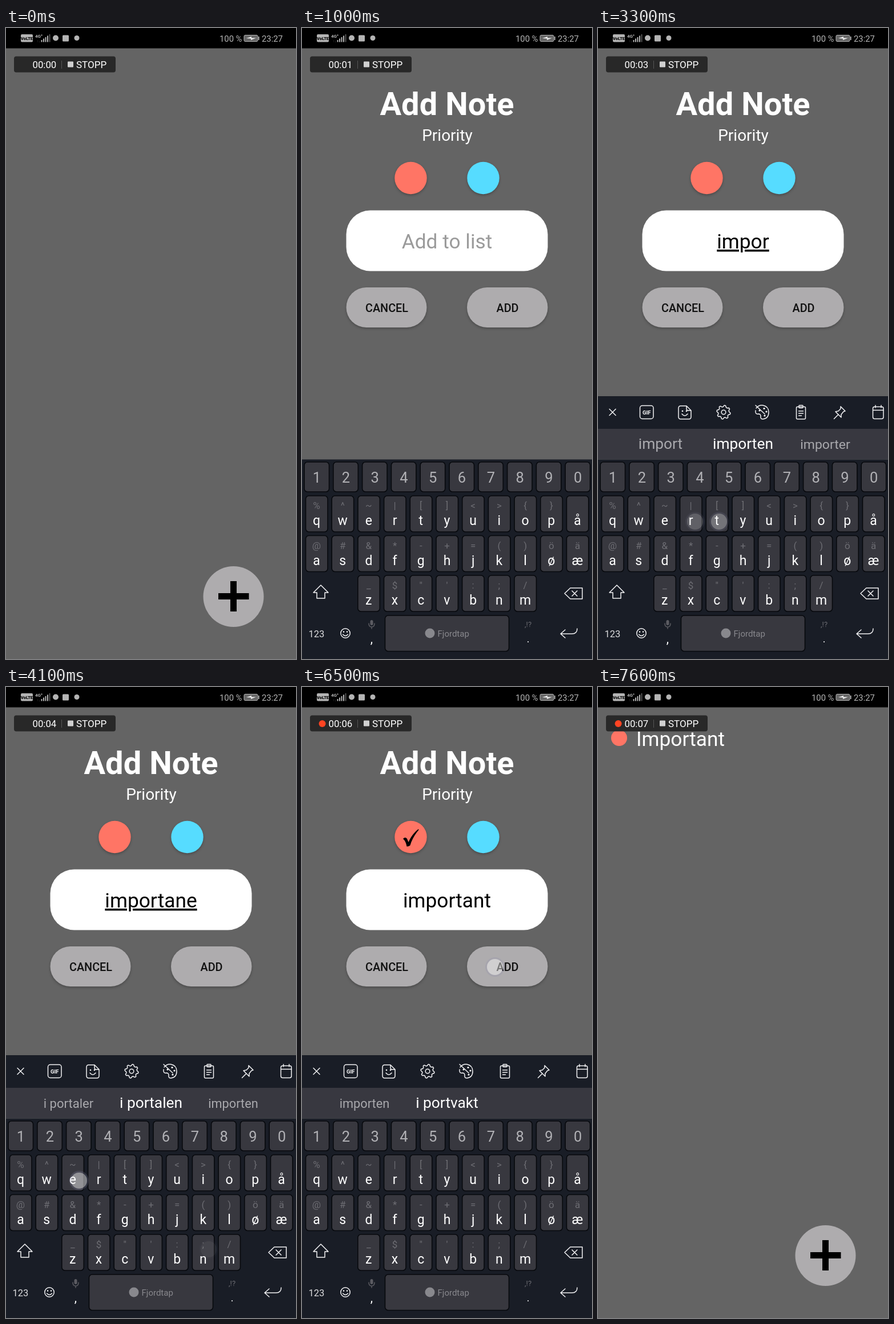
An HTML page that plays this animation: 508x1102 px, repeating every 8 s.

```html
<!DOCTYPE html>
<html lang="en">
<head>
<meta charset="utf-8">
<title>Add a note</title>
<style>
html, body { margin: 0; width: 100%; height: 100%; overflow: hidden; background: #646464; }
svg { display: block; width: 100%; height: 100%; }
text { font-family: Roboto, sans-serif; fill: #fff; white-space: pre; }
.mid { text-anchor: middle; }
.lift { filter: drop-shadow(0 2px 2px #0004); }
.line { fill: none; stroke: #f2f2f4; stroke-width: 1.5; stroke-linecap: round; stroke-linejoin: round; }
.field { text-decoration-skip-ink: none; }
</style>
</head>
<body>
<svg id="stage" viewBox="0 0 508 1102"></svg>
<script>
const LOOP = 8000, STEP = 100;
const RED = '#ff7565', BUTTON = '#aeacae', DIM = '#a9a9ad';

const rect = (x, y, w, h, r, fill, more = '') =>
  `<rect x="${x}" y="${y}" width="${w}" height="${h}" rx="${r}" fill="${fill}" ${more}/>`;
const disc = (x, y, r, fill, more = '') =>
  `<circle cx="${x}" cy="${y}" r="${r}" fill="${fill}" ${more}/>`;
const label = (x, y, size, str, fill = '#fff', more = 'class="mid"') =>
  `<text x="${x}" y="${y}" font-size="${size}" style="fill:${fill}" ${more}>${str}</text>`;
const line = (d, more = '') => `<path class="line" d="${d}" ${more}/>`;
const ring = (x, y, r) => `<circle class="line" cx="${x}" cy="${y}" r="${r}"/>`;
const group = (id, body, more = '') => `<g id="${id}" ${more}>${body}</g>`;
const safe = c => ({ '<': '&lt;', '>': '&gt;', '&': '&amp;' }[c] || c);

function statusBar() {
  const grey = '#b4b4b4';
  let s = rect(0, 0, 508, 35.5, 0, '#000') + rect(26, 11, 21, 13.5, 2, grey)
    + label(36.5, 20.6, 7.4, 'VoLTE', '#000', 'class="mid" font-weight="900"')
    + label(51, 17, 8, '4G⁺', grey, 'font-weight="700"')
    + label(54, 24.5, 6, '↑↓', '#555', '');
  for (let i = 0; i < 5; i++) {
    const h = 3.5 + i * 2.5;
    s += rect(61.5 + i * 3.5, 24.5 - h, 2, h, 0, i < 4 ? grey : '#555');
  }
  return s + disc(87, 17.5, 5, grey) + rect(99, 12.5, 11, 11, 1.5, grey) + disc(124, 17.5, 4.5, grey)
    + label(374, 23.5, 14.8, '100 %', grey, '')
    + rect(417, 12.5, 24, 11, 2, '#666', `stroke="${grey}"`) + rect(442, 15, 1.6, 6, 0, grey)
    + '<path d="M421 18l9-3v2.500h8l-9 3.500v-2.500z" fill="#eee"/>'
    + label(448, 23.5, 14.8, '23:27', grey, '');
}

function listScreen() {
  return group('row', disc(37, 89, 14, RED) + label(67, 103, 35.3, 'Important', '#fff', ''))
    + disc(398.5, 993, 53, BUTTON)
    + rect(372, 987, 53.5, 11, 0, '#000') + rect(393, 966, 11, 53, 0, '#000');
}

function noteScreen() {
  const bold = 'class="mid" font-weight="500"';
  return label(254, 152, 56, 'Add Note', '#fff', 'class="mid" font-weight="700"')
    + label(254.5, 197, 28, 'Priority')
    + disc(190.5, 262, 28.2, RED, 'class="lift"') + disc(317.5, 262, 28.2, '#56dcff', 'class="lift"')
    + '<path id="check" d="M177 265q4-4 7 0l2.500 6q6-14 17.500-23l.5 1.500q-11 13-15 27-2.500 2.500-6 2-1.500-9-6.500-13.500z"/>'
    + rect(77.5, 318.5, 353, 106, 42, '#fff')
    + label(254, 385, 35.3, '', '#000', 'id="field" class="mid field"')
    + rect(77.5, 453, 141, 70, 35, BUTTON, 'class="lift"') + rect(289, 453, 141.5, 70, 35, BUTTON, 'class="lift"')
    + label(148.5, 495.5, 19.8, 'CANCEL', '#111', bold) + label(360, 495.5, 19.8, 'ADD', '#111', bold);
}

function gear(cx, cy) {
  const pts = [];
  for (let i = 0; i < 32; i++) {
    const r = i % 4 < 2 ? 12 : 9.5, a = (i + 0.5) * Math.PI / 16;
    pts.push((cx + r * Math.cos(a)).toFixed(1) + ' ' + (cy + r * Math.sin(a)).toFixed(1));
  }
  return line('M' + pts.join('L') + 'Z') + ring(cx, cy, 3.8);
}

function toolbar() {
  const box = (x, y, w, h, r) => rect(x, y, w, h, r, 'none', 'class="line"');
  return rect(0, 643, 508, 57, 0, '#191d26') + rect(0, 700, 508, 53, 0, '#383840')
    + line('M20 665.500l11 11m0-11l-11 11')
    + box(73.5, 659.5, 23.5, 23, 4) + label(85.2, 674.8, 9.5, 'GIF', '#fff', 'class="mid" font-weight="700"')
    + line('M145 660h10l8 8v11q0 4-4 4h-14q-4 0-4-4v-15q0-4 4-4zm10 0v5q0 3 3 3h5M147 674q5 6 10 0')
    + disc(148, 669, 1.3, '#fff') + disc(155, 669, 1.3, '#fff')
    + gear(220, 671)
    + line('M277 664q5-6 12-5 10 2 10 12 0 11-10 12-5 0-4-5 0-4-4-4-6 1-5-6M276 659l16 15')
    + disc(283, 668, 1.5, '#fff') + disc(291, 664.5, 1.6, '#fff') + disc(295, 670, 1.6, '#fff') + disc(292, 677, 1.6, '#fff')
    + box(347.5, 661.5, 16, 21.5, 2) + box(352, 659, 7, 4.5, 1) + line('M351.500 669h8m-8 4h8m-8 4h5')
    + line('M425 661l8 8-3 1-4 5 0 5-10-10 5-1 4-4zM420.500 675.500l-7 7')
    + box(481.5, 661.5, 18.5, 21, 3) + line('M482 667.500h18M486 659v4m10-4v4')
    + label(109.5, 735, 26, '', DIM, 'class="mid sug"') + label(254, 735, 26.3, '', '#fff', 'class="mid sug"')
    + label(398, 735, 26, '', DIM, 'class="mid sug"');
}

function keyboard() {
  const cap = (x, y, w, h) => rect(x, y, w, h, 5.5, '#38383f', 'stroke="#07090d" stroke-width="1.6"');
  let s = rect(0, 753.5, 508, 350, 0, '#191d26');
  [...'1234567890'].forEach((c, i) => {
    const x = 25.5 + i * 50.8;
    s += cap(x - 21.5, 758, 43.5, 52) + label(x + 0.5, 794, 25.5, c, '#b2b2b6');
  });
  const rows = [
    [25.5, 817, 'qwertyuiopå', '%^~|[]<>{}'],
    [25.5, 886.5, 'asdfghjkløæ', '@#&*-+=()öä'],
    [116.8, 956, 'zxcvbnm', '_$"\':;/']
  ];
  for (const [x0, y, keys, marks] of rows) {
    [...keys].forEach((c, i) => {
      const x = x0 + i * 45.7;
      s += cap(x - 19, y, 38.5, 63) + label(x, y + 23, 17, safe(marks[i] || ''), '#6d6d73')
        + label(x, y + 51, 23, c);
    });
  }
  return s + cap(145.5, 1026, 217, 62.5)
    + disc(224, 1057, 8.5, '#88888d')
    + label(237.5, 1062.5, 15, 'Fjordtap', '#88888d', 'style="font-family:\'Open Sans\',sans-serif"')
    + line('M33 973l13 13h-6v10h-14v-10h-6z')
    + line('M470 978h21v19h-21l-10-9.500zM473 983l9 9m0-9l-9 9')
    + label(25.5, 1063.5, 16.5, '123', '#dcdcde')
    + ring(76, 1057, 8.2) + line('M71.500 1059q4.500 5 9 0') + disc(73, 1054.5, 1.2, '#fff') + disc(79, 1054.5, 1.2, '#fff')
    + rect(119.5, 1034, 5, 9, 2.5, '#5c5c62')
    + line('M117 1040q0 6 5 6t5-6m-5 6v3', 'style="stroke:#5c5c62"')
    + label(122, 1074, 22, ',') + label(396, 1046, 13, ',!?', '#6d6d73') + label(396, 1073, 18, '.')
    + line('M482 1049q0 9-9 9h-20m8-7l-8 7 8 7');
}

const stage = document.getElementById('stage');
stage.innerHTML = rect(0, 0, 508, 1102, 0, '#646464')
  + group('list', listScreen()) + group('note', noteScreen())
  + group('keys', group('tools', toolbar()) + keyboard())
  + statusBar()
  + rect(14, 49.5, 178, 28, 4, '#282828') + disc(35.5, 64, 6, '#ff4422', 'id="rec"')
  + label(46.5, 70, 16.8, '', '#fff', 'id="clock"') + rect(97, 57, 1, 14, 0, '#555')
  + rect(108, 58.5, 10, 10, 1, '#d0d0d0') + label(123, 70, 17, 'STOPP', '#fff', '')
  + group('touches', '');

const el = id => document.getElementById(id);
const show = (id, on) => el(id).setAttribute('visibility', on ? 'visible' : 'hidden');
const sugs = [...document.querySelectorAll('.sug')];

// start time, x, y
const taps = [
  [500, 400, 992], [2000, 348, 858], [2300, 403, 1010], [2600, 424, 860],
  [2900, 392, 858], [3100, 170, 862], [3300, 212, 862], [3500, 20, 939],
  [3800, 355, 982], [4000, 128, 862], [4750, 487, 1001], [4950, 212, 862],
  [5900, 192, 268], [6390, 338, 489]
];
const typed = [
  [0, ''], [2100, 'i'], [2400, 'im'], [2700, 'imp'], [3000, 'impo'], [3200, 'impor'],
  [3400, 'import'], [3600, 'importa'], [3900, 'importan'], [4100, 'importane'],
  [4900, 'importan'], [5100, 'important']
];
const hints = [
  [0, '||'], [2100, 'imot|i|imorgen'], [2700, 'import|imp|impulser'],
  [3000, 'import|importen|importer'], [3600, 'i portaler|i portalen|importen'],
  [5100, 'importen|i portvakt|']
];
const glow = [[0, 0.3], [100, 0.45], [200, 0.2], [300, 0.06], [320, 0]];

const latest = (table, t) => table.filter(r => r[0] <= t).pop()[1];
function mix(table, t) {
  const i = table.findIndex(r => r[0] > t);
  if (i < 1) return 0;
  const [a, va] = table[i - 1], [b, vb] = table[i];
  return va + (vb - va) * (t - a) / (b - a);
}
const part = (t, a, b) => Math.min(1, Math.max(0, (t - a) / (b - a)));

function fit(node, str, max) {
  if (node.textContent === str) return;
  node.textContent = str;
  node.setAttribute('font-size', 26.3);
  const w = node.getComputedTextLength();
  if (w > max) node.setAttribute('font-size', (26.3 * max / w).toFixed(2));
}

function draw(t) {
  const adding = t >= 700 && t < 6600;
  show('list', !adding);
  show('row', t >= 6600);
  show('note', adding);
  show('check', adding && t >= 6100);
  show('rec', t % 1000 >= 500);
  el('clock').textContent = '00:0' + Math.floor(t / 1000);

  const text = latest(typed, t), field = el('field');
  field.textContent = text || 'Add to list';
  field.style.fill = text ? '#000' : '#9b9b9b';
  field.style.textDecorationLine = text && t < 6400 ? 'underline' : 'none';

  const rise = 1 - (1 - part(t, 700, 950)) ** 2, fall = part(t, 6500, 6700);
  show('keys', true);
  el('keys').setAttribute('transform', `translate(0 ${(350 * (1 - rise) + 460 * fall).toFixed(1)})`);
  el('tools').setAttribute('display', t >= 2100 ? 'inline' : 'none');
  if (t >= 2100) latest(hints, t).split('|').forEach((s, i) => fit(sugs[i], s, i === 1 ? 130 : 87.5));

  el('touches').innerHTML = taps.map(([at, x, y]) => {
    const a = mix(glow, t - at);
    return a > 0 ? `<g opacity="${a.toFixed(3)}">${disc(x, y, 17, '#88a', 'opacity=".5"')}${disc(x, y, 14, '#fff')}</g>` : '';
  }).join('');
}

const start = performance.now();
let last = -1;
function tick() {
  const t = Math.floor((performance.now() - start) % LOOP / STEP) * STEP;
  if (t !== last) draw(last = t);
  requestAnimationFrame(tick);
}
tick();
</script>
</body>
</html>
```
